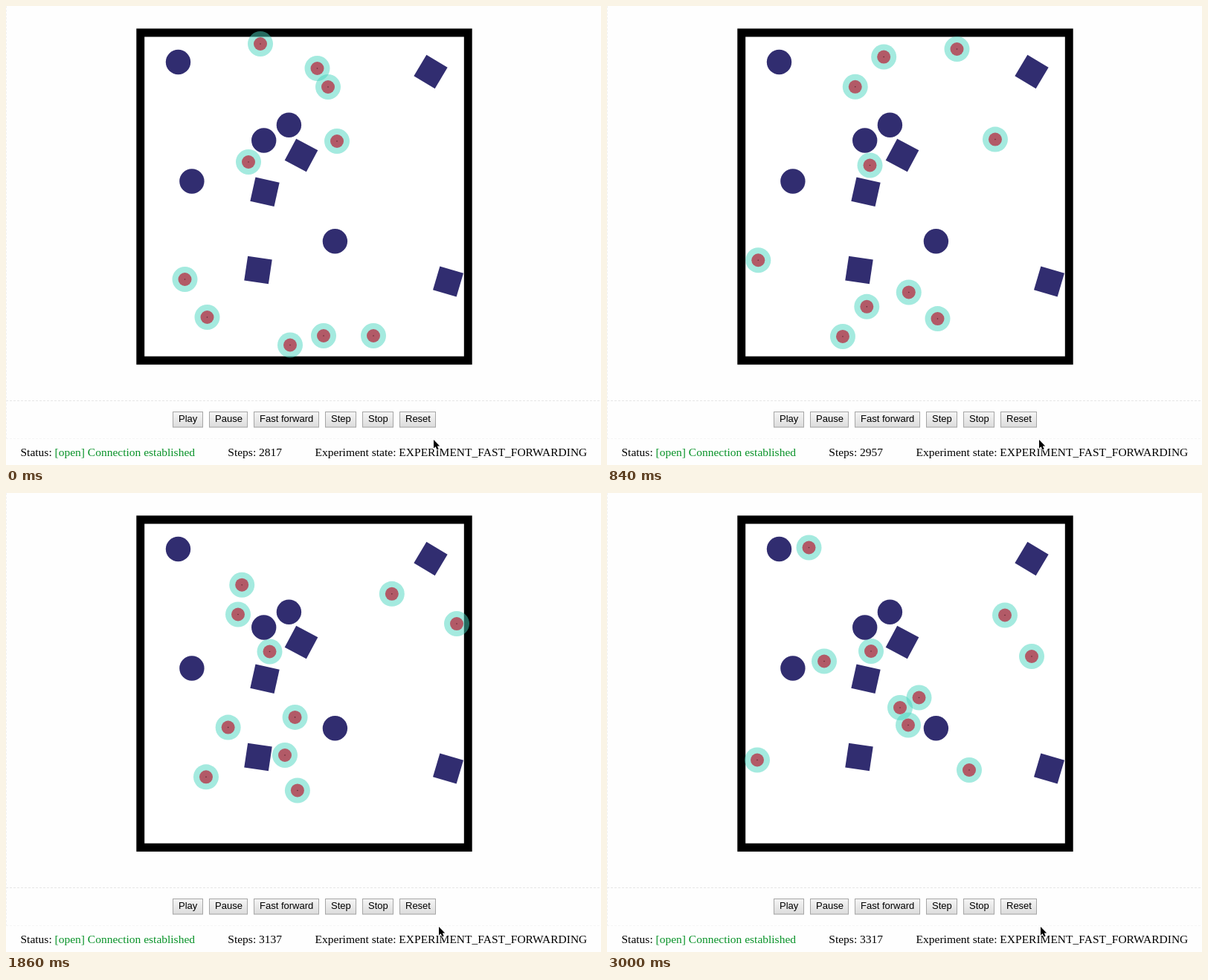
Write an HTML page with a canvas that moves like this. It is 800x618 px and loops after 3.06 s.

```html
<!DOCTYPE html>
<html lang="en">
<head>
<meta charset="utf-8">
<title>Swarm experiment</title>
<style>
  html, body { margin: 0; width: 100%; height: 100%; overflow: hidden; background: #fefefe; }
  canvas { display: block; }
</style>
</head>
<body>
<canvas id="stage" width="800" height="618"></canvas>
<script>
const g = document.getElementById('stage').getContext('2d');
const LOOP = 3060, TICK = 60, FIRST_STEP = 2817, LAST = 500, SPEED = 0.55;
const NAVY = '#312d70';

// Each robot: where it starts and the points where it bumps into something and turns.
const robots = [
  [[342, 51], [334, 64], [333.5, 153], [312, 163.5], [279, 217], [292, 226.5]],
  [[418.5, 84], [384, 52], [327.5, 131], [264, 86], [268, 80], [271.5, 73.5]],
  [[433, 109], [470.5, 58], [571, 220]],
  [[445, 182], [606, 177], [606, 162], [535, 164.5]],
  [[326, 210], [337.5, 221.5], [353.5, 214.5], [364.5, 225], [354.5, 213.5], [358, 226], [355, 213]],
  [[240.5, 368], [197, 352.5], [197, 344], [394, 289]],
  [[270.5, 419], [307.5, 458], [338, 416], [487, 373]],
  [[382, 456.5], [378, 432.5], [336, 392], [197, 372], [202, 359.5]],
  [[427, 444], [405, 421], [407, 328], [371, 277], [392.5, 272], [419.5, 275.5]],
  [[494, 444], [475, 451], [375, 353], [410.5, 324], [408, 318], [405, 312.5]]
].map(plan);

const discs = [[231.5, 75.5], [380.4, 160.2], [346.7, 181], [249.9, 236], [442.4, 316.8]];
const boxes = [[571, 88.5, 31], [397, 201, 28], [348, 250.3, 12.5], [339, 355.5, 8.5], [594.5, 371, 16.5]];

// All robots drive at one speed; the time left over is split evenly between the turns.
function plan(stops) {
  const times = stops.slice(1).map(([x, y], i) => Math.hypot(x - stops[i][0], y - stops[i][1]) / SPEED);
  const driving = times.reduce((a, b) => a + b);
  return { stops, times, pause: (LAST - driving) / (times.length - 1) };
}

function place({ stops, times, pause }, step) {
  let i = 0;
  while (i < times.length - 1 && step >= times[i] + pause) step -= times[i++] + pause;
  const k = Math.min(1, step / times[i]);
  return stops[i].map((from, axis) => from + (stops[i + 1][axis] - from) * k);
}

function disc(x, y, r, color) {
  g.fillStyle = color;
  g.beginPath();
  g.arc(x, y, r, 0, 7);
  g.fill();
}

function box([x, y, deg]) {
  g.save();
  g.translate(x, y);
  g.rotate(deg * Math.PI / 180);
  g.fillStyle = NAVY;
  g.fillRect(-16.5, -16.5, 33, 33);
  g.restore();
}

function text(str, x, y, color = '#000') {
  g.fillStyle = color;
  g.fillText(str, x, y);
}

function dashes(x1, y1, x2, y2, color) {
  g.strokeStyle = color;
  g.lineWidth = 1;
  g.setLineDash([3, 2]);
  g.beginPath();
  g.moveTo(x1, y1);
  g.lineTo(x2, y2);
  g.stroke();
  g.setLineDash([]);
}

// Draws one button and returns where the next begins.
function button(x, label) {
  const w = Math.round(g.measureText(label).width + 15.5);
  const shade = g.createLinearGradient(0, 546, 0, 567);
  shade.addColorStop(0, '#f6f6f6');
  shade.addColorStop(1, '#dcdcdc');
  g.fillStyle = shade;
  g.fillRect(x, 546, w, 21.5);
  g.strokeStyle = '#a6a6a6';
  g.lineWidth = 1;
  g.strokeRect(x + 0.5, 546.5, w - 1, 20.5);
  text(label, x + 8, 560);
  return x + w + 8;
}

function pointer(x, y) {
  g.save();
  g.translate(x, y);
  const arrow = new Path2D('M0 0V11.5L2.6 9.2 4.6 13.5 6.7 12.5 4.8 8.4H8.2Z');
  g.strokeStyle = '#fff';
  g.lineWidth = 1.5;
  g.stroke(arrow);
  g.fillStyle = '#000';
  g.fill(arrow);
  g.restore();
}

function draw(now) {
  const n = Math.floor(now % LOOP / TICK);
  // The counter skips ahead once and later pauses for one tick.
  const step = 10 * (n + (n >= 28) - (n >= 47));

  g.fillStyle = '#fefefe';
  g.fillRect(0, 0, 800, 618);
  dashes(0, 531.5, 800, 531.5, '#e6e6e6');
  dashes(0, 582.5, 800, 582.5, '#f5f5f5');
  dashes(0.5, 0, 0.5, 582, '#f2f2f2');

  g.fillStyle = '#000';
  g.fillRect(175.3, 30.4, 451.4, 452.4);
  g.fillStyle = '#fff';
  g.fillRect(186.2, 41.5, 429.6, 430.2);

  for (const robot of robots) {
    const [x, y] = place(robot, step);
    disc(x, y, 17, 'rgba(75,213,191,.5)');
    disc(x, y, 9, '#b25a67');
    disc(x, y, 0.8, '#602834');
  }
  for (const [x, y] of discs) disc(x, y, 16.7, NAVY);
  boxes.forEach(box);

  g.font = '13px "Liberation Sans", Arial, sans-serif';
  ['Play', 'Pause', 'Fast forward', 'Step', 'Stop', 'Reset'].reduce(button, 224);

  g.font = '15.5px "Liberation Serif", Times, serif';
  text('Status:', 19.5, 606);
  text('[open] Connection established', 65.5, 606, '#089228');
  text('Steps: ' + (FIRST_STEP + step), 298.3, 606);
  text('Experiment state: EXPERIMENT_FAST_FORWARDING', 415.6, 606);

  pointer(575 + Math.min(n, 6) + Math.floor(n / 25), 584);
}

const start = performance.now();
function loop() {
  draw(performance.now() - start);
  requestAnimationFrame(loop);
}
loop();
</script>
</body>
</html>
```
